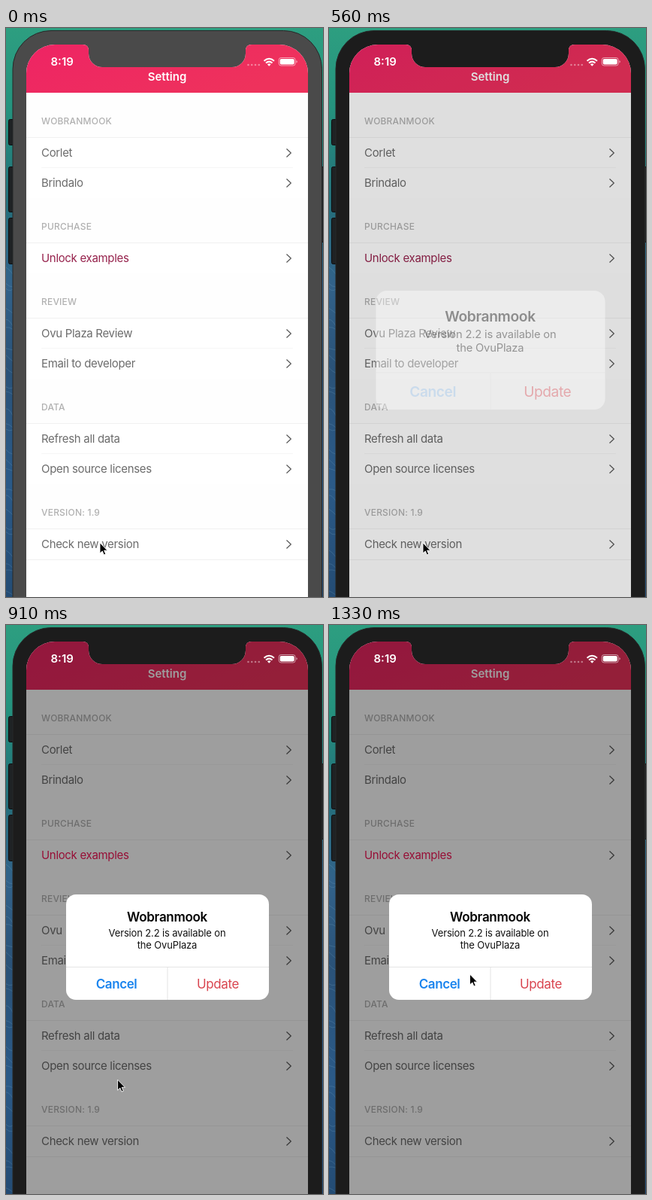
These frames come from a looping animation (422 px wide and 756 px high, 1.4 s). An HTML page:

```html
<!DOCTYPE html>
<html lang="en">
<head>
<meta charset="utf-8">
<title>Setting</title>
<style>
html, body { margin: 0; width: 100%; height: 100%; overflow: hidden; }
svg { display: block; width: 422px; height: 756px; font-family: Inter, "Liberation Sans", sans-serif; }
.head { font-size: 12px; font-weight: 500; letter-spacing: .2px; fill: #b0b0b0; }
.row { font-size: 15px; letter-spacing: -.32px; fill: #6c6c6c; }
.bar { font-size: 15px; font-weight: 600; fill: #fff; }
.mid { text-anchor: middle; }
.title { font-size: 17px; font-weight: 600; letter-spacing: -.3px; fill: #000; }
.note { font-size: 13px; letter-spacing: -.15px; fill: #111; }
.btn { font-size: 17px; letter-spacing: -.4px; }
</style>
</head>
<body>
<svg viewBox="0 0 422 756">
  <defs>
    <linearGradient id="sea" x2="0" y2="1">
      <stop offset="0" stop-color="#2d9e80"/>
      <stop offset=".14" stop-color="#25937e"/>
      <stop offset=".3" stop-color="#24707a"/>
      <stop offset=".45" stop-color="#32628a"/>
      <stop offset=".6" stop-color="#2a5278"/>
      <stop offset=".8" stop-color="#2b5a88"/>
      <stop offset="1" stop-color="#244c74"/>
    </linearGradient>
    <linearGradient id="pink" x2="1" y2=".4">
      <stop offset="0" stop-color="#ee2464"/>
      <stop offset="1" stop-color="#ee325c"/>
    </linearGradient>
    <clipPath id="screen">
      <path d="M27 756V60A38 38 0 0 1 65 22H102Q110 22 110 30V34A18 18 0 0 0 128 52H301A18 18 0 0 0 319 34V30Q319 22 327 22H364A38 38 0 0 1 402 60V756Z"/>
    </clipPath>
  </defs>

  <rect width="422" height="756" fill="url(#sea)"/>
  <path id="waves" fill="none" stroke="#7fb0cc" stroke-opacity=".22"/>

  <g fill="#1f2224" stroke="#0c0e10">
    <rect x="3.5" y="121.5" width="8" height="34" rx="2"/>
    <rect x="3.5" y="184.5" width="8" height="60" rx="2"/>
    <rect x="3.5" y="252.5" width="8" height="61" rx="2"/>
    <rect x="416" y="184.5" width="8" height="100" rx="2"/>
  </g>
  <rect id="bezel" x="9" y="3.5" width="411.5" height="840" rx="51" stroke="#262828"/>

  <g clip-path="url(#screen)">
    <rect x="27" y="22" width="375" height="734" fill="#fff"/>
    <g id="list"></g>
    <rect x="27" y="22" width="375" height="64" fill="url(#pink)"/>
    <text class="bar mid" x="214.5" y="69.5">Setting</text>
    <rect id="dim" x="27" y="22" width="375" height="734"/>
  </g>

  <text class="bar" x="59.5" y="50">8:19</text>
  <g fill="#fff">
    <g id="dots" fill-opacity=".4"></g>
    <g fill="none" stroke="#fff" stroke-width="2">
      <path d="M343.5 43.7Q350.2 37.8 357 43.7"/>
      <path d="M346 46.5Q350.2 42.7 354.5 46.5"/>
    </g>
    <path d="M347.9 48.2Q350.2 46.3 352.6 48.2L350.2 50.7Z"/>
    <rect x="363.2" y="39.5" width="22" height="10.5" rx="3" fill="none" stroke="#fff" stroke-opacity=".55"/>
    <rect x="364.7" y="41" width="19" height="7.5" rx="1.8"/>
    <path d="M386.5 43v3.5q1.3-.5 1.3-1.75t-1.3-1.75z" fill-opacity=".6"/>
  </g>

  <g id="alert">
    <rect id="panel" x="80" y="358" width="270" height="140" rx="13" fill="#fff"/>
    <g id="ink">
      <text class="title mid" x="214.5" y="394">Wobranmook</text>
      <text class="note mid" x="214.5" y="414">Version 2.2 is available on</text>
      <text class="note mid" x="214.5" y="430">the OvuPlaza</text>
      <path d="M80 454.5H350M215 454.5V498" stroke="#dedede" stroke-width=".8"/>
      <text id="cancel" class="btn mid" x="147" y="483" font-weight="600" fill="#1a84ee">Cancel</text>
      <text class="btn mid" x="282" y="483" fill="#d9454f">Update</text>
    </g>
  </g>

  <path id="cursor" d="M0 0V14L3.3 11 5.4 16 7.700 15 5.600 10.200H10Z" fill="#000" stroke="#fff" stroke-width=".9" stroke-linejoin="round"/>
</svg>
<script>
const LOOP = 1400, STEP = 70, POP = 560;
const $ = id => document.getElementById(id);
const set = (id, name, value) => $(id).setAttribute(name, value);
const clamp = v => Math.min(1, Math.max(0, v));
const mix = (a, b, k) => a + (b - a) * k;
const smooth = k => k * k * (3 - 2 * k);

const sections = [
  [124, "WOBRANMOOK", "Corlet", "Brindalo"],
  [264, "PURCHASE", "Unlock examples"],
  [364, "REVIEW", "Ovu Plaza Review", "Email to developer"],
  [504, "DATA", "Refresh all data", "Open source licenses"],
  [644, "VERSION: 1.9", "Check new version"]
];

const line = (x1, x2, y, color) => `<path d="M${x1} ${y}H${x2}" stroke="${color}"/>`;

function section([y, name, ...rows]) {
  const top = y + 21.5;
  let s = `<rect x="27" y="${y - 38}" width="375" height="60" fill="#fefefe"/>
    <text class="head" x="47" y="${y + 4.3}">${name}</text>`;
  rows.forEach((label, i) => {
    const mid = y + 42 + i * 40;
    const id = label.startsWith("Unlock") ? ' id="unlock"' : "";
    s += `<text class="row"${id} x="47" y="${mid + 5.3}">${label}</text>
      <path d="M373.5 ${mid - 5.5}l5.8 5.5-5.8 5.5" fill="none" stroke="#555" stroke-width="1.2"/>`;
    if (i) s += line(47, 382, mid - 20.5, "#f6f6f6");
  });
  return s + line(27, 402, top, "#f0f0f0") + line(27, 402, top + rows.length * 40 + 1, "#f0f0f0");
}
$("list").innerHTML = sections.map(section).join("");

$("dots").innerHTML = [0, 1, 2, 3]
  .map(i => `<circle cx="${322.5 + i * 4.75}" cy="49" r="1.3"/>`).join("");

// faint ripples on the sea
let ripples = "";
for (let i = 0; i < 26; i++) {
  const y = 318 + i * 17 + 6 * Math.sin(i * 2.3);
  ripples += `M0 ${y}q4 ${2 + 3 * Math.sin(i)} 9 ${5 + 4 * Math.cos(i * 1.7)}`;
}
set("waves", "d", ripples);

function draw(t) {
  const grey = Math.round(mix(74, 28, clamp(t / 490)));
  set("bezel", "fill", `rgb(${grey},${grey},${grey})`);

  // shade and alert arrive together
  const open = t >= POP;
  const k = clamp((t - POP) / 155);
  set("dim", "opacity", open ? mix(.125, .38, clamp((t - POP) / 180)) : 0);
  set("alert", "visibility", open ? "visible" : "hidden");
  set("alert", "transform", `translate(214.8 428) scale(${mix(1.13, 1, k)}) translate(-214.8 -428)`);
  set("panel", "opacity", clamp(mix(.42, 1.2, k)));
  set("ink", "opacity", mix(.4, 1, k));
  set("cancel", "opacity", mix(.4, 1, clamp(k * 1.3)));
  $("unlock").style.fill = t < 630 ? "#96224c" : "#f21656";

  const go = smooth(clamp((t - 770) / 350)), drift = clamp((t - 1120) / 210);
  const x = mix(125, 192, go) - 4.5 * drift, y = mix(684, 457, go) + 7 * drift;
  set("cursor", "transform", `translate(${x} ${y})`);
}

const start = performance.now();
function tick() {
  const t = (performance.now() - start) % LOOP;
  draw(Math.floor(t / STEP) * STEP);
  requestAnimationFrame(tick);
}
tick();
</script>
</body>
</html>
```
